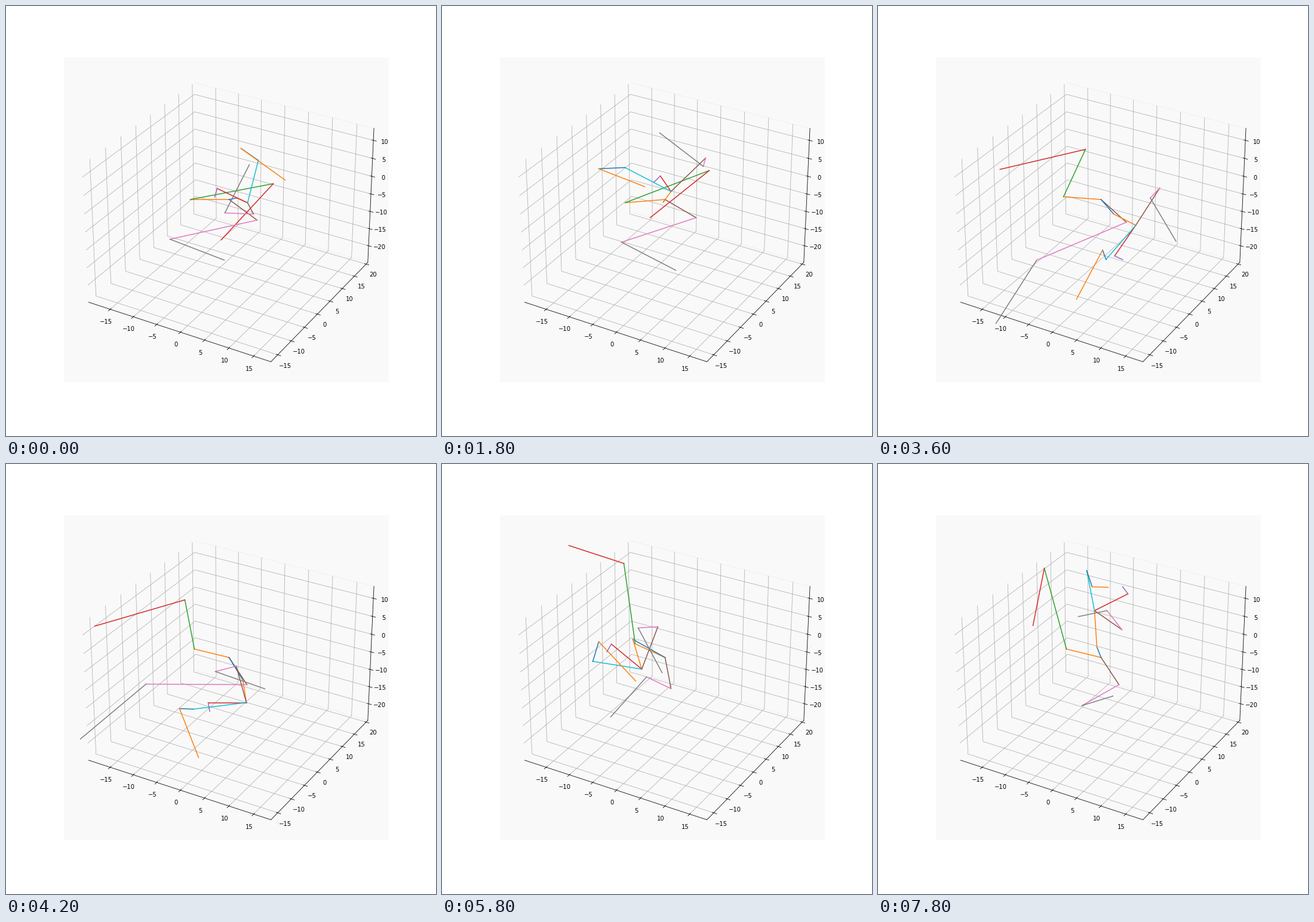
A matplotlib script for the animation above (8 s loop, 720x720 px).

```python
import numpy as np
import matplotlib.pyplot as plt
from matplotlib.animation import FuncAnimation

SIZE, FRAMES, STEP = 720, 40, 200
KEYS = np.array([0, 9, 14, 21, 29, 35, 39])
TIME = np.arange(FRAMES)
HIP = 373 + 323.5j
PELVIS_TURN = [47, 52, 54, 30, 10, 21, 30]

# Limbs in drawing order: joint, its parent, colour and place (x + yj) at KEYS.
LIMBS = [
    ("l_knee", "l_hip", "C2",
     [447+297j, 447+275j, 404+314j, 299+227j, 304+166j, 306+170j, 278+174j]),
    ("l_foot", "l_knee", "C3",
     [360+391j, 348+354j, 276+333j, 148+271j, 212+136j, 142+202j, 259+270j]),
    ("r_knee", "r_hip", "C6",
     [274+390j, 300+395j, 328+462j, 234+368j, 342+356j, 335+373j, 341+404j]),
    ("r_foot", "r_knee", "C7",
     [365+425j, 391+442j, 348+559j, 124+460j, 282+423j, 369+434j, 393+388j]),
    ("spine", "hip", "C0",
     [386+321j, 370+328j, 385+335j, 396+361j, 319+293j, 377+316j, 366+306j]),
    ("chest", "spine", "C1",
     [404+329j, 383+310j, 410+297j, 402+399j, 334+343j, 327+272j, 362+245j]),
    ("neck", "chest", "C3",
     [353+305j, 365+284j, 467+309j, 338+399j, 283+301j, 386+251j, 418+217j]),
    ("r_arm", "chest", "C5",
     [414+348j, 441+254j, 497+324j, 385+338j, 361+272j, 417+292j, 408+277j]),
    ("r_elbow", "r_arm", "C6",
     [366+346j, 437+268j, 497+327j, 350+347j, 328+274j, 403+255j, 383+245j]),
    ("r_hand", "r_elbow", "C7",
     [407+265j, 364+212j, 429+366j, 433+376j, 368+349j, 305+284j, 335+255j]),
    ("l_arm", "chest", "C9",
     [422+258j, 306+270j, 424+350j, 313+410j, 252+330j, 342+197j, 349+178j]),
    ("l_elbow", "l_arm", "C0",
     [393+238j, 262+272j, 435+349j, 290+409j, 262+297j, 382+214j, 358+205j]),
    ("l_hand", "l_elbow", "C1",
     [467+291j, 339+302j, 334+345j, 322+491j, 324+363j, 285+246j, 385+206j]),
]


def smooth(values):
    """Value at every frame, on a cubic that does not overshoot its keys."""
    v = np.asarray(values, float)
    h = np.diff(KEYS)
    d = np.diff(v) / h
    m = np.concatenate([d[:1], np.zeros(len(d) - 1), d[-1:]])
    for k in range(1, len(d)):
        a, b = d[k - 1], d[k]
        if a * b > 0:
            m[k] = 2 * a * b / (a + b)
    k = np.clip(np.searchsorted(KEYS, TIME, side="right") - 1, 0, len(h) - 1)
    s = (TIME - KEYS[k]) / h[k]
    ease = s * s * (3 - 2 * s)
    bend = s * (1 - s) * h[k] * ((1 - s) * m[k] - s * m[k + 1])
    return v[k] + (v[k + 1] - v[k]) * ease + bend


def swing(pivot, points):
    """Turn a bone about its moving pivot: angle and length ease separately."""
    bone = np.array(points) - pivot[KEYS]
    angle = smooth(np.unwrap(np.angle(bone)))
    return pivot + smooth(np.abs(bone)) * np.exp(1j * angle)


def motion():
    # The right hip follows an arc and the left one mirrors it.
    dx = smooth(PELVIS_TURN)
    dy = 53 - dx ** 2 / 120
    hip = np.full(FRAMES, HIP)
    joints = {
        "hip": hip,
        "r_hip": hip + dx + 1j * dy,
        "l_hip": hip - 46 - 0.4 * dx + 1j * (45 - 1.3 * dy),
    }
    bones = [("hip", "l_hip", "C1"), ("hip", "r_hip", "C5")]
    for name, parent, colour, points in LIMBS:
        joints[name] = swing(joints[parent], points)
        bones.append((parent, name, colour))

    # The short head bone stays bent sideways from the neck.
    neck = joints["neck"] - joints["chest"]
    joints["head"] = joints["neck"] + 15 * neck / abs(neck) * np.exp(-1j * np.radians(100))
    bones.append(("neck", "head", "C4"))
    return joints, bones


fig = plt.figure(figsize=(10, 10), dpi=72, facecolor="white")
fig.subplots_adjust(left=0.125, right=0.9, bottom=0.125, top=0.88)

room = fig.add_subplot(projection="3d")
room.set_facecolor("#f9f9f9")
room.view_init(elev=30, azim=-60)
room.set(xlim=(-19.75, 18.45), ylim=(-17.45, 20.75), zlim=(-24.9, 13.3))
for axis in (room.xaxis, room.yaxis, room.zaxis):
    axis.pane.set(fill=False, edgecolor="none")
room.yaxis.pane.set(alpha=1, edgecolor="#eeeeee", linewidth=0.8)

# Overlay measured in pixels, with whole numbers at pixel centres.
stage = fig.add_axes([0, 0, 1, 1])
stage.set(xlim=(-0.5, SIZE - 0.5), ylim=(SIZE - 0.5, -0.5))
stage.axis("off")

joints, bones = motion()
lines = [stage.plot([], [], color=colour, lw=1.5)[0] for _, _, colour in bones]


def draw(i):
    for line, (a, b, _) in zip(lines, bones):
        ends = np.array([joints[a][i], joints[b][i]])
        line.set_data(ends.real, ends.imag)
    return lines


anim = FuncAnimation(fig, draw, frames=FRAMES, interval=STEP, repeat=True,
                     repeat_delay=0, blit=False)
plt.show()
```
